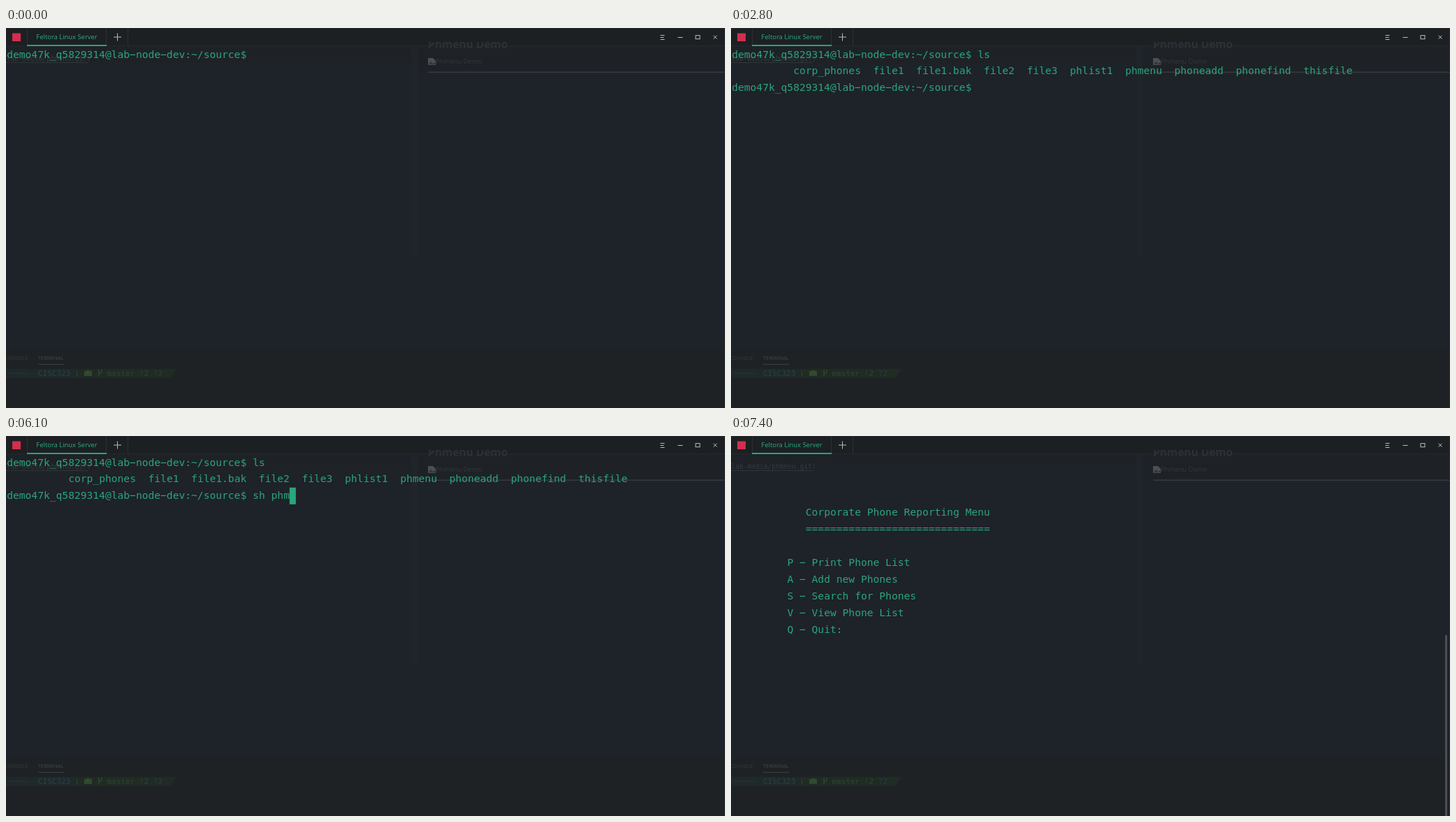
Recreate the animation shown at these times as an HTML page. Size 1029x544 px, loop 8000 ms.

```html
<!DOCTYPE html>
<html lang="en">
<head>
<meta charset="utf-8">
<title>Terminal phone menu</title>
<style>
  :root { --cell: 8.8px; --row: 23.9px; --green: #2aa57c; }
  html, body { margin: 0; width: 100%; height: 100%; overflow: hidden; background: #1e2229; }
  svg { position: absolute; inset: 0; display: block; }
  .ui { font-family: "Noto Sans", sans-serif; }
  .mono { font-family: "DejaVu Sans Mono", monospace; }

  #term {
    position: absolute; left: 1.2px; top: 25.6px; color: var(--green);
    font: 14.617px/23.9px "DejaVu Sans Mono", monospace; white-space: pre;
  }
  #term div {
    position: absolute; height: var(--row);
    left: calc(var(--col, 0) * var(--cell)); top: calc(var(--line, 0) * var(--row));
  }
  #term div, .bar { animation: 8s step-end infinite; }
  #term .typed { overflow: hidden; width: 0; }
  #term .shell { animation-name: shell; }
  #term .output { animation-name: output; }
  #term .menu, .bar { animation-name: menu; }
  #term .list { animation-name: list; }
  #term .run { animation-name: run; }
  #term .cursor {
    left: 0; top: 0; width: 9px; height: 24px; background: var(--green);
    animation-name: move, blink;
  }

  /* 1.25% = 100 ms */
  @keyframes shell { 0% { visibility: visible } 87.5%, 100% { visibility: hidden } }
  @keyframes menu { 0% { visibility: hidden } 87.5%, 100% { visibility: visible } }
  @keyframes output {
    0% { visibility: hidden } 18.75% { visibility: visible } 87.5%, 100% { visibility: hidden }
  }
  @keyframes list {
    0% { width: 0 } 11.25% { width: 1ch } 12.5% { width: 2ch } 87.5%, 100% { width: 0 }
  }
  @keyframes run {
    0% { width: 0 } 48.75% { width: 1ch } 50% { width: 2ch } 56.25% { width: 3ch }
    62.5% { width: 4ch } 68.75% { width: 5ch } 76.25% { width: 6ch } 77.5% { width: 7ch }
    80% { width: 8ch } 86.25% { width: 9ch } 87.5%, 100% { width: 0 }
  }
  @keyframes move {
    0% { translate: calc(40 * var(--cell)) 0 }
    11.25% { translate: calc(41 * var(--cell)) 0 }
    12.5% { translate: calc(42 * var(--cell)) 0 }
    18.75% { translate: calc(40 * var(--cell)) calc(2 * var(--row)) }
    48.75% { translate: calc(41 * var(--cell)) calc(2 * var(--row)) }
    50% { translate: calc(42 * var(--cell)) calc(2 * var(--row)) }
    56.25% { translate: calc(43 * var(--cell)) calc(2 * var(--row)) }
    62.5% { translate: calc(44 * var(--cell)) calc(2 * var(--row)) }
    68.75% { translate: calc(45 * var(--cell)) calc(2 * var(--row)) }
    76.25% { translate: calc(46 * var(--cell)) calc(2 * var(--row)) }
    77.5% { translate: calc(47 * var(--cell)) calc(2 * var(--row)) }
    80% { translate: calc(48 * var(--cell)) calc(2 * var(--row)) }
    86.25% { translate: calc(49 * var(--cell)) calc(2 * var(--row)) }
    87.5%, 100% { translate: calc(19 * var(--cell)) calc(10 * var(--row)) }
  }
  @keyframes blink {
    0%, 20%, 35%, 57.5%, 66.25%, 92.5%, 100% { opacity: 0 }
    5%, 27.5%, 42.5%, 62.5%, 67.5% { opacity: 1 }
  }
</style>
</head>
<body>
<svg width="1029" height="544" viewBox="0 0 1029 544">
  <rect width="1029" height="544" fill="#1e2229"/>
  <rect y="26" width="580" height="24" fill="#1e2227"/>
  <rect x="590" y="26" width="439" height="38" fill="#1e2227"/>
  <rect x="580" y="26" width="10" height="300" fill="#20242b"/>
  <rect y="460" width="1029" height="84" fill="#1e2224"/>
  <rect width="1029" height="25.5" fill="#1c2022"/>
  <path d="M0 .5H1029M0 25.5H1029" stroke="#25292c"/>

  <!-- dim editor showing through -->
  <clipPath id="cut"><rect x="600" y="20" width="120" height="12"/></clipPath>
  <text class="ui" clip-path="url(#cut)" x="604" y="28.5" font-size="15.5" font-weight="700" fill="#2c3137">Phmenu Demo</text>
  <path d="M604 43h7l4 4v6h-11z" fill="#4a4f53"/>
  <path d="M605 52l3-4 3 3 3-2v3z" fill="#30363a"/>
  <text class="ui" x="615" y="51.2" font-size="9.4" fill="#32373c">Phmenu Demo</text>
  <path d="M604 63.3H1028" stroke="#363b40" stroke-width="1.4"/>
  <text class="mono" x="0.5" y="47" font-size="9.6" fill="#333a3e">lab-media/phmenu.gif)</text>
  <path d="M0 49.5H117" stroke="#30363a"/>

  <g class="ui" font-size="7.4">
    <text x="-2" y="474.7" fill="#33383a">CONSOLE</text>
    <text x="46" y="474.7" fill="#41464a">TERMINAL</text>
  </g>
  <path d="M46 481.5H83" stroke="#3a3f42"/>
  <path d="M0 488H244l-9 13H0z" fill="#20292a"/>
  <path d="M100 488H244l-9 13H100z" fill="#202b24"/>
  <g class="mono" font-size="11" fill="#2d4530">
    <path d="M4 494.5h30" stroke="#243235"/>
    <text x="46" y="498" fill="#244448">CISC323</text>
    <text x="98" y="498">)</text>
    <path d="M112 491h3l1-1h3l1 1h3v7h-11z" fill="#304a2e"/>
    <path d="M133 490v9M133 495q4 0 4-4M132 490h2M136 490h2" fill="none" stroke="#34502f"/>
    <text x="144.5" y="498">master !2</text>
    <text x="211" y="498" fill="#263c46">?2</text>
  </g>

  <!-- title bar -->
  <rect x="9" y="7.5" width="12" height="11.5" fill="#d22f4e"/>
  <path d="M30.5 0V25M143.5 0V25M174.5 0V25" stroke="#2b3033"/>
  <rect x="30" y="24" width="114" height="2" fill="#2aa57c"/>
  <text class="ui" x="87" y="16" text-anchor="middle" font-size="9.35" fill="#2aa57c">Feltora Linux Server</text>
  <g fill="none" stroke="#b9bcbd">
    <path d="M154 13H165M159.5 7.5V18.5"/>
    <path d="M936.5 10.5h6M936.5 13.5h5M936.5 16.5h6"/>
    <path d="M961.5 13.5h7"/>
    <rect x="987" y="10.7" width="6" height="5"/>
    <path d="M1012.5 10.7l5 5M1017.5 10.7l-5 5"/>
  </g>
  <path d="M1028.5 0V544" stroke="#263033"/>
  <rect class="bar" x="1022" y="285" width="3" height="259" fill="#4b5054"/>
</svg>

<div id="term">
  <div class="shell">demo47k_q5829314@lab−node−dev:~/source$</div>
  <div class="typed list" style="--col:40">ls</div>
  <div class="output" style="--col:10;--line:1">corp_phones  file1  file1.bak  file2  file3  phlist1  phmenu  phoneadd  phonefind  thisfile</div>
  <div class="output" style="--line:2">demo47k_q5829314@lab−node−dev:~/source$</div>
  <div class="typed run" style="--col:40;--line:2">sh phmenu</div>
  <div class="menu" style="--col:12;--line:3">Corporate Phone Reporting Menu
==============================</div>
  <div class="menu" style="--col:9;--line:6">P − Print Phone List
A − Add new Phones
S − Search for Phones
V − View Phone List
Q − Quit:</div>
  <div class="cursor"></div>
</div>
</body>
</html>
```
